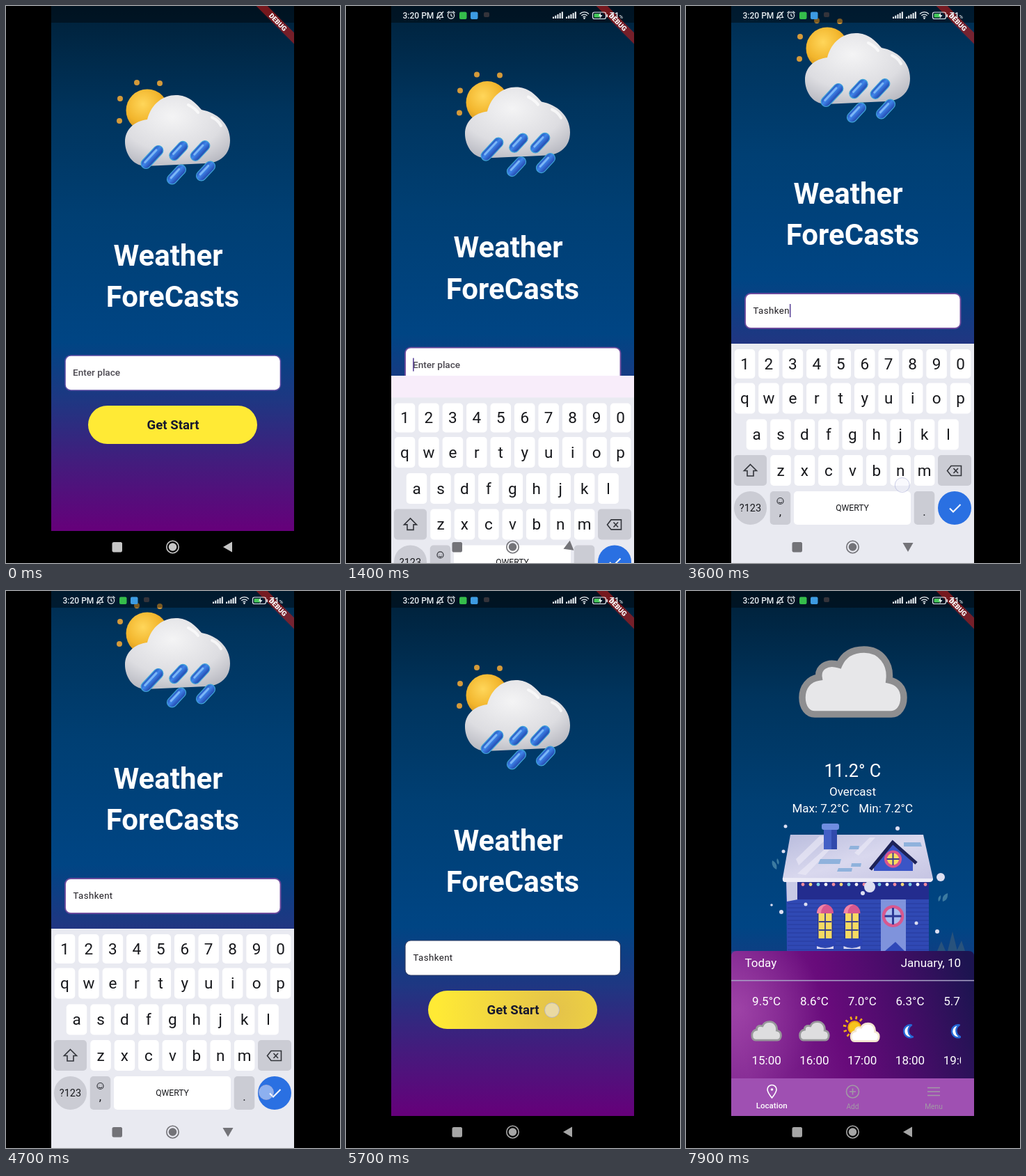
Write an HTML page that moves like this. It is 480 px wide and 800 px high and loops after 8 s.

```html
<!DOCTYPE html>
<html lang="en">
<head>
<meta charset="utf-8">
<title>Weather ForeCasts</title>
<style>
html, body { margin: 0; width: 100%; height: 100%; overflow: hidden; background: #000; }
svg { display: block; width: 480px; height: 800px; font-family: Roboto, sans-serif; }
.mid { text-anchor: middle; }
.bold { font-weight: 700; }
.line { fill: none; stroke-width: 1.6; }
.w17 { font-size: 17px; fill: #fff; }
</style>
</head>
<body>
<svg viewBox="0 0 480 800">
<defs>
  <linearGradient id="sky" gradientUnits="userSpaceOnUse" x1="0" y1="0" x2="0" y2="754">
    <stop offset="0" stop-color="#002038"/><stop offset=".2" stop-color="#00345d"/>
    <stop offset=".4" stop-color="#003f73"/><stop offset=".64" stop-color="#004584"/>
    <stop offset=".75" stop-color="#1e3782"/><stop offset=".87" stop-color="#431c7d"/>
    <stop offset="1" stop-color="#66007a"/>
  </linearGradient>
  <radialGradient id="sun" cx=".4" cy=".35" r=".7">
    <stop offset="0" stop-color="#ffd65a"/><stop offset=".6" stop-color="#f2b52c"/><stop offset="1" stop-color="#c98a1c"/>
  </radialGradient>
  <radialGradient id="puff" cx=".45" cy=".3" r=".75">
    <stop offset="0" stop-color="#f4f4f5"/><stop offset=".65" stop-color="#dddde1"/><stop offset="1" stop-color="#b9bac2"/>
  </radialGradient>
  <linearGradient id="drop" x1="0" y1="0" x2="0" y2="1">
    <stop offset="0" stop-color="#2a55c0"/><stop offset=".4" stop-color="#3f86ea"/><stop offset="1" stop-color="#2347ae"/>
  </linearGradient>
  <linearGradient id="panel" x1="0" y1=".4" x2="1" y2=".2">
    <stop offset="0" stop-color="#842a93"/><stop offset=".4" stop-color="#680b7b"/>
    <stop offset=".65" stop-color="#4b0c6b"/><stop offset="1" stop-color="#1c1450"/>
  </linearGradient>
  <radialGradient id="glow" gradientUnits="userSpaceOnUse" cx="75" cy="600" r="120">
    <stop offset="0" stop-color="#b458b8" stop-opacity=".55"/><stop offset="1" stop-color="#b458b8" stop-opacity="0"/>
  </radialGradient>
  <radialGradient id="ripple" gradientUnits="userSpaceOnUse" cx="300" cy="602" r="170">
    <stop offset="0" stop-color="#c89a60" stop-opacity=".5"/><stop offset="1" stop-color="#c89a60" stop-opacity="0"/>
  </radialGradient>
  <linearGradient id="roof" x1="0" y1="0" x2="1" y2="1">
    <stop offset="0" stop-color="#b9bcdd"/><stop offset=".5" stop-color="#d9d8ee"/><stop offset="1" stop-color="#c4c3e2"/>
  </linearGradient>
  <clipPath id="app"><rect x="65" width="349" height="800"/></clipPath>
  <clipPath id="body"><rect id="bodyBox" x="65" width="349" height="754"/></clipPath>
  <clipPath id="hoursClip"><rect x="85" y="560" width="310" height="140"/></clipPath>
  <path id="cloud" d="M185 177H295C306 177 313 166 313 153C313 138 303 130 292 128C295 104 280 84 256 84C238 84 226 92 220 106C201 100 189 111 191 124C176 126 167 138 167 153C167 168 175 177 185 177Z"/>
  <g id="moon">
    <path d="M3 -8.5A9 9 0 1 0 5 8.5A9.5 9.5 0 0 1 3 -8.5Z" fill="#fff" stroke="#2569d6" stroke-width="2.4" stroke-linejoin="round"/>
  </g>
  <g id="window">
    <rect x="-11" y="10" width="22" height="42" fill="#26348f"/>
    <rect x="-9.500" y="12" width="19" height="37" fill="#f7da62"/>
    <path d="M0 12V49M-9 25H9M-9 37H9" stroke="#39408f" stroke-width="1.8"/>
    <path d="M-12 13A12 13 0 0 1 12 13Z" fill="#d8588f"/>
    <path d="M-12 13A12 13 0 0 1 2 0.500Q-6 4 -6 13Z" fill="#ee86a9"/>
    <rect x="-15" y="49" width="30" height="10" rx="2" fill="#2c44b4"/>
    <path d="M-12 60q12 6 24 0v4h-24z" fill="#d9d8f0"/>
  </g>
</defs>
<rect width="480" height="800"/>
<g clip-path="url(#app)">
  <g id="start">
    <rect x="65" width="349" height="754" fill="#f8edfa"/>
    <g clip-path="url(#body)"><g id="scroll">
      <rect x="65" width="349" height="754" fill="url(#sky)"/>
      <circle cx="203" cy="150" r="30.500" fill="url(#sun)"/>
      <g id="beads" fill="#d49a3a"></g>
      <path d="M200 230C181 229 171 211 171 195C171 177 185 165 203 163C209 140 226 128 244 128C263 128 273 140 281 149C303 153 322 169 322 193C322 214 307 225 288 226Z" fill="url(#puff)"/>
      <path d="M262 142q10 5 14 11M296 160q9 4 13 12" fill="none" stroke="#fff" stroke-width="4" stroke-linecap="round" opacity=".7"/>
      <g id="drops"></g>
      <g fill="#fff" class="bold" font-size="42">
        <text x="154.500" y="372.500">Weather</text>
        <text x="239.500" y="432" class="mid">ForeCasts</text>
      </g>
      <rect id="field" x="85" y="502" width="309.500" height="50" rx="8" fill="#fff"/>
      <text id="hint" x="96" y="531" font-size="13.600" font-weight="500" fill="#4b4850">Enter place</text>
      <text id="typed" x="96.500" y="531" font-size="13.200" letter-spacing=".45" fill="#1d1b20"></text>
      <rect id="caret" y="517" width="1.700" height="19" fill="#65509f"/>
      <rect x="118" y="574" width="243" height="55" rx="27.500" fill="#ffea35"/>
      <rect id="press" x="118" y="574" width="243" height="55" rx="27.500" fill="url(#ripple)"/>
      <text x="240" y="608" class="mid bold" font-size="18.600" fill="#16182f">Get Start</text>
    </g></g>
  </g>

  <g id="weather">
    <rect x="65" width="349" height="754" fill="url(#sky)"/>
    <use href="#cloud" fill="#e7e7e9" stroke="#8e8e90" stroke-width="9.500"/>
    <g fill="#fff" font-size="17">
      <text x="239.500" y="267" class="mid" font-size="25.400">11.2° C</text>
      <text x="239.500" y="294" class="mid">Overcast</text>
      <text x="152.500" y="318">Max: 7.2°C</text>
      <text x="248.300" y="318">Min: 7.2°C</text>
    </g>
    <g id="house">
      <path d="M144 415H160V430H349V517H145Z" fill="#3049b4"/>
      <g id="siding" stroke="#263b9c" stroke-width="1"></g>
      <path d="M144 415H161V443L145 446Z" fill="#c9cae6"/>
      <rect x="160" y="417" width="189" height="26" fill="#232c8e"/>
      <rect x="280" y="443" width="36" height="74" fill="#7f93dc"/>
      <path d="M150 350H341L355 413Q355 418 349 418H143Q138 418 139 412Z" fill="url(#roof)"/>
      <path d="M139 412L355 413Q355 418 349 418H143Q138 418 139 412Z" fill="#ecebf7"/>
      <path d="M158 385l34-33h14l-44 42zM160 406l38-34h8l-34 36zM242 376l22-22h8l-24 26z" fill="#f0eff9" opacity=".55"/>
      <path d="M193 385h30l-2 7h-31zM236 366h13l-1 5h-14zM219 398h20l-1 5h-21zM238 391h14l-1 5h-14zM313 361h24l2 6h-26z" fill="#8fb2dc"/>
      <rect x="198" y="340" width="19" height="31" fill="#4360c6"/>
      <rect x="209" y="340" width="8" height="31" fill="#314aac"/>
      <rect x="195" y="334" width="25" height="9" rx="3" fill="#6f8de0"/>
      <path d="M270 396L297 362L326 390V402H270Z" fill="#3a55c6"/>
      <path d="M265 400L297 361L331 391" fill="none" stroke="#1d2257" stroke-width="5"/>
      <circle cx="297.500" cy="385" r="10.500" fill="#f8dc62" stroke="#d9548f" stroke-width="4"/>
      <path d="M297.500 376V394M288.500 385H306.500" stroke="#3a3c8e" stroke-width="2"/>
      <g id="lights"></g>
      <use href="#window" x="200" y="450"/><use href="#window" x="238.500" y="450"/>
      <circle cx="297.500" cy="467" r="13.500" fill="#a9bdf0" stroke="#d8588f" stroke-width="4.500"/>
      <path d="M297.500 455V479M285.500 467H309.500" stroke="#2d3995" stroke-width="3"/>
      <path d="M286 517L301 504L314 517Z" fill="#2f48b8"/>
      <path d="M361 517L367 503L373 517ZM376 517L383 489L390 517ZM389 517L396 502L401 517Z" fill="#28527c"/>
      <path d="M124 387q8 4 6 13q-8-4-6-13M131 384q4 3 2 9q-4-3-2-9M376 434q-9 3-7 12q8-2 7-12M366 437q-5 3-3 9q4-3 3-9" fill="#3c7aa0"/>
      <g id="flakes" fill="#dddff2"></g>
    </g>
    <path id="sheet" d="M65 754V525Q65 517 73 517H406Q414 517 414 525V754Z" fill="url(#panel)"/>
    <rect x="65" y="517" width="349" height="183" fill="url(#glow)"/>
    <path d="M65 559.500H414" stroke="#a9a3c6" stroke-width="1.400"/>
    <text x="84.500" y="540" class="w17">Today</text>
    <text x="395" y="540" class="w17" text-anchor="end">January, 10</text>
    <g clip-path="url(#hoursClip)" id="hours"></g>
    <rect x="65" y="700" width="349" height="54" fill="#9f50b2"/>
    <g class="line" stroke="#fff">
      <path d="M123.500 728Q117 720 117 716A6.500 6.500 0 0 1 130 716Q130 720 123.500 728Z"/>
      <circle cx="123.500" cy="716" r="1.800" fill="#fff" stroke="none"/>
      <g stroke="#a29aa5"><circle cx="239.500" cy="719" r="9"/><path d="M239.500 714.500V723.500M235 719H244M347 713.500H365M347 719H365M347 724.500H365"/></g>
    </g>
    <text x="123.200" y="743" class="mid" font-size="11.600" font-weight="500" fill="#fff">Location</text>
    <g class="mid" font-size="10.200" fill="#a29aa5"><text x="239.500" y="744">Add</text><text x="356" y="744">Menu</text></g>
  </g>

  <rect x="65" width="349" height="24" opacity=".42"/>
  <g transform="translate(414 0) rotate(45)">
    <rect x="-42" y="27" width="84" height="11.500" fill="#b71c1c" opacity=".64"/>
    <text y="36.300" class="mid" font-size="9.900" font-weight="900" fill="#fff">DEBUG</text>
  </g>

  <g id="keyboard">
    <rect x="65" y="485" width="349" height="315" fill="#e9eaf1"/>
    <g id="keys" class="mid" font-size="22.500" fill="#17181c"></g>
    <g class="line" stroke="#33353b">
      <path d="M92.500 658.500L101.500 667.500H97V675H88V667.500H83.500Z"/>
      <path d="M381 660.500H395.500V674.500H381L375.500 667.500ZM384.500 664L391 671M391 664L384.500 671"/>
      <circle cx="135.500" cy="711" r="4.500" stroke-width="1.200"/><path d="M133 712.500q2.500 2.500 5 0M133.800 709.500v.6M137.200 709.500v.6" stroke-width="1.100"/>
    </g>
    <path d="M379 721.500L384 726.500L394.500 716" class="line" stroke="#fff" style="stroke-width:2"/>
  </g>
</g>

<g id="status" fill="#e8ecf0">
  <text x="81.500" y="18" font-size="12" font-weight="500">3:20 PM</text>
  <g class="line" stroke="#e8ecf0" style="stroke-width:1.2">
    <path d="M130.500 16.500H139.500L138 14V11.500A3.200 3.200 0 0 0 131.800 11.500V14ZM134 18.500h2M140 8L130.500 18.500"/>
    <circle cx="151" cy="13.500" r="4.600"/><path d="M151 11V13.800L153 15M145.500 10l3-2.500M156.500 10l-3-2.500"/>
    <path d="M336 11.500a9 9 0 0 1 13 0M338.300 13.800a6 6 0 0 1 8.400 0M340.500 16a3 3 0 0 1 4 0"/>
    <rect x="354.500" y="9" width="19" height="9.500" rx="2.500"/>
  </g>
  <circle cx="342.500" cy="17.800" r="1.200"/>
  <rect x="163" y="8.500" width="10.500" height="10.500" rx="2" fill="#35bd4b"/>
  <rect x="179" y="8.500" width="10.500" height="10.500" rx="2" fill="#3d9be2"/>
  <rect x="198" y="9" width="8" height="7" rx="2" fill="#34333a"/>
  <rect x="356.500" y="11" width="9" height="5.500" rx="1" fill="#46c95a"/>
  <path d="M366 9.500l-3 5h2.500l-1 4 4-5.500H366z"/><rect x="374.500" y="12" width="1.500" height="4"/>
  <g id="bars"></g>
  <text x="379" y="18" font-size="12" font-weight="500">71<tspan font-size="7">%</tspan></text>
</g>
<g id="nav">
  <rect x="153" y="770.500" width="13.500" height="13.500" rx="1.500"/>
  <circle cx="239.500" cy="777" r="8.700" fill="none" stroke-width="1.600"/><circle cx="239.500" cy="777" r="5.800" stroke="none"/>
  <path id="back" d="M312 777L325 769.500V784.500Z" stroke="none"/>
</g>
<g id="touches"></g>
</svg>
<script>
const $ = id => document.getElementById(id);
const add = (parent, tag, attrs, text) => {
  const node = document.createElementNS('http://www.w3.org/2000/svg', tag);
  for (const name in attrs) node.setAttribute(name, attrs[name]);
  if (text) node.textContent = text;
  return parent.appendChild(node);
};
const dots = (id, list) => list.forEach(([cx, cy, r]) => add($(id), 'circle', { cx, cy, r }));

// Scenery
dots('beads', [[188, 110, 4], [221, 111, 4], [164, 133, 4], [163, 165, 4]]);
dots('flakes', [[264, 425, 8], [366, 411, 6], [143, 338, 2.5], [304, 341, 3], [140, 374, 2.5], [123, 451, 1.8],
  [137, 461, 3], [331, 477, 2.5], [361, 489, 3], [172, 450, 2.5], [254, 434, 3]]);
[[210, 217, 40], [248, 208, 32], [279, 208, 34], [245, 242, 33], [287, 237, 33]].forEach(([x, y, len]) => {
  const drop = add($('drops'), 'g', { transform: `translate(${x} ${y}) rotate(-47)` });
  add(drop, 'rect', { x: -len / 2, y: -7, width: len, height: 14, rx: 7, fill: 'url(#drop)', stroke: '#3fa5d8', 'stroke-width': 1.2 });
  add(drop, 'rect', { x: -len / 2 + 6, y: -4, width: len - 13, height: 3, rx: 1.5, fill: '#8cc4fb', opacity: .8 });
});
for (let y = 449; y < 517; y += 6) add($('siding'), 'path', { d: `M146 ${y}H349` });
for (let i = 0; i < 17; i++) add($('lights'), 'circle', {
  cx: 168 + i * 11, cy: 421.5, r: 2.4, fill: ['#f08a9c', '#f5d878', '#7fd0e4', '#f4f0f4'][i % 4]
});
for (const left of [297, 316]) for (let i = 0; i < 5; i++)
  add($('bars'), 'rect', { x: left + i * 3.2, y: 15.5 - i * 1.8, width: 2.1, height: 2.5 + i * 1.8 });

// Hourly forecast
['9.5', '8.6', '7.0', '6.3', '5.7'].forEach((temp, i) => {
  const x = 115.6 + i * 68.8, hours = $('hours');
  add(hours, 'text', { x, y: 595, class: 'mid w17' }, temp + '°C');
  add(hours, 'text', { x, y: 680, class: 'mid w17' }, 15 + i + ':00');
  const cloud = (cx, cy, scale, fill, stroke) => add(hours, 'use', {
    href: '#cloud', fill, stroke, 'stroke-width': 10, transform: `translate(${cx} ${cy}) scale(${scale}) translate(-240 -131)`
  });
  if (i < 2) cloud(x, 632, .285, '#dededf', '#98989b');
  else if (i > 2) add(hours, 'use', { href: '#moon', x: x - 1, y: 632 });
  else {
    add(hours, 'circle', { cx: x - 11, cy: 627, r: 9, fill: '#f7c51e', stroke: '#eb9a12', 'stroke-width': 2 });
    for (let a = 100; a <= 310; a += 30) add(hours, 'path', {
      d: 'M12 0H16.500', stroke: '#f3ad17', 'stroke-width': 2.6, transform: `translate(${x - 11} 627) rotate(${a})`
    });
    cloud(x + 4, 634, .275, '#fff', '#f3e6cf');
  }
});

// Keyboard
const PITCH = 34.45, keyAt = {};
const key = (x, y, w, h, label, fill = '#fff', rx = 5, size = 22.5) => {
  const box = add($('keys'), 'rect', { x: x - w / 2, y: y - h / 2, width: w, height: h, rx, fill });
  if (label) add($('keys'), 'text', { x, y: y + size * .355, 'font-size': size }, label);
  keyAt[label] = { x, y, box };
};
[['1234567890', 84.5, 514], ['qwertyuiop', 84.5, 563.5], ['asdfghjkl', 101.5, 615.5], ['zxcvbnm', 136, 667]]
  .forEach(([letters, x, y]) => [...letters].forEach((c, i) => key(x + i * PITCH, y, 29.5, y < 520 ? 42 : 44, c)));
const GREY = '#cbccd4';
key(92.5, 667, 47, 44, '', GREY);
key(386, 667, 48, 44, '', GREY);
key(92.5, 721, 47, 48, '?123', GREY, 23.5, 14.5);
key(135.5, 721, 29.5, 48, '', GREY);
add($('keys'), 'text', { x: 135.5, y: 732, 'font-size': 17 }, ',');
key(239, 721, 168, 48, 'QWERTY', '#fff', 5, 12.2);
key(342.5, 721, 29.5, 48, '', GREY);
add($('keys'), 'text', { x: 342.5, y: 732, 'font-size': 17 }, '.');
key(386, 721, 48, 48, '', '#2a70e2', 24);

// Touches: start, end, x, y
const strokes = [['T', 2150, 2300], ['a', 2380, 2480], ['s', 2650, 2750], ['h', 2880, 2980],
  ['k', 3080, 3180], ['e', 3280, 3380], ['n', 3460, 3560], ['t', 3800, 3900]]
  .map(([char, from, to]) => ({ char, from, to, key: keyAt[char.toLowerCase()] }));
const touches = [
  { from: 950, to: 1080, x: 236, y: 527 }, { from: 4600, to: 4760, x: 374, y: 720 }, { from: 5620, to: 5760, x: 296, y: 602 },
  ...strokes.map(({ char, from, to, key }) => char === 'a'
    ? { from, to, x: 89, y: 627 } : { from, to, x: key.x + 2.5, y: key.y + 21 })
];
touches.forEach(touch => touch.node = add($('touches'), 'circle', {
  cx: touch.x, cy: touch.y, r: 10.5, fill: '#f0f0fc', 'fill-opacity': .5, stroke: '#a9add6', 'stroke-opacity': .75
}));

// Piecewise linear value from time/value pairs
const track = (t, ...points) => {
  const i = points.findIndex(p => p[0] > t);
  if (i < 0) return points[points.length - 1][1];
  if (!i) return points[0][1];
  const [[t0, a], [t1, b]] = [points[i - 1], points[i]];
  return a + (b - a) * (t - t0) / (t1 - t0);
};
const set = (id, name, value) => $(id).setAttribute(name, value);
const show = (id, on) => set(id, 'visibility', on ? 'visible' : 'hidden');

function render(t) {
  const drop = track(t, [1200, 315], [1300, 190], [1400, 78], [1500, 20], [1600, 0], [4800, 0], [4900, 75], [5000, 210], [5100, 315]);
  const bottom = track(t, [1200, 754], [1300, 650], [1400, 531.5], [1500, 485], [4800, 485], [4900, 560], [5000, 695], [5080, 754]);
  const scroll = track(t, [1350, 0], [1400, 11], [1500, 50], [1600, 80], [1700, 89], [4800, 89], [4900, 65], [5000, 20], [5100, 0]);
  set('keyboard', 'transform', `translate(0 ${drop})`);
  show('keyboard', drop < 315);
  set('bodyBox', 'height', bottom);
  set('scroll', 'transform', `translate(0 ${-scroll})`);

  const focused = t >= 1080 && t < 4760;
  set('field', 'stroke', t < 1080 ? '#5a4ba3' : focused ? '#6b4a9c' : '#2c3a63');
  set('field', 'stroke-width', focused ? 1.9 : t < 1080 ? 1.6 : 1.2);
  const text = strokes.filter(s => t >= s.to).map(s => s.char).join('');
  $('typed').textContent = text;
  show('hint', !text);
  const lastInput = Math.max(1080, ...strokes.filter(s => t >= s.to).map(s => s.to));
  show('caret', focused && (t - lastInput) % 1000 < 500);
  set('caret', 'x', text ? 96.5 + $('typed').getComputedTextLength() : 96);
  set('press', 'opacity', track(t, [5600, 0], [5700, 1], [5850, 1], [6050, 0]));

  const enter = track(t, [5950, 0], [6250, 1]);
  const ease = 1 - (1 - enter) ** 3, scale = .88 + .12 * ease;
  show('weather', enter > 0);
  set('weather', 'opacity', Math.min(1, enter * 1.6));
  set('weather', 'transform', `translate(239.5 377) scale(${scale}) translate(-239.5 -377)`);

  show('status', t >= 200);
  const tint = drop < 170 ? '#737378' : t < 200 ? '#c6c6c6' : '#a6a6a6';
  set('nav', 'fill', tint);
  set('nav', 'stroke', tint);
  const turn = track(t, [1350, 0], [1400, -22], [1600, -90], [4800, -90], [5100, 0]);
  set('back', 'transform', `rotate(${turn} 319 777)`);

  strokes.forEach(s => s.key.box.setAttribute('fill', '#fff'));
  strokes.filter(s => t >= s.from && t < s.to).forEach(s => s.key.box.setAttribute('fill', '#eae8ec'));
  touches.forEach(({ node, from, to }) =>
    node.setAttribute('opacity', track(t, [from - 1, 0], [from, 1], [to, 1], [to + 180, 0])));
}
function frame() {
  render(performance.now() % 8000);
  requestAnimationFrame(frame);
}
frame();
</script>
</body>
</html>
```
